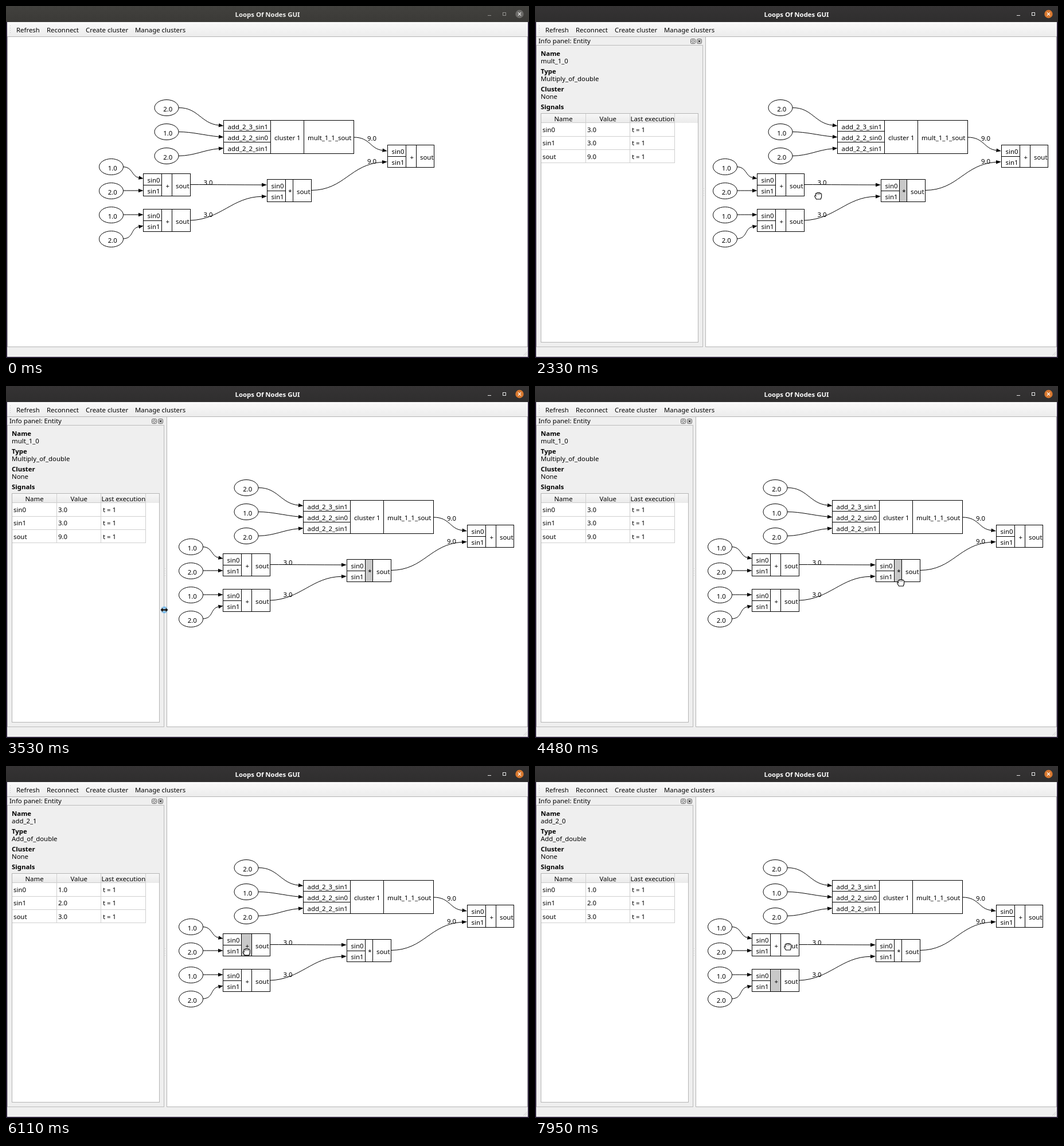
An HTML page with a canvas for the animation above (7.99 s loop, 912x614 px).

```html
<!DOCTYPE html>
<html lang="en">
<head>
<meta charset="utf-8">
<title>Node graph</title>
<style>
html, body { margin: 0; width: 100%; height: 100%; overflow: hidden; background: #fff; }
canvas { display: block; width: 912px; height: 614px; }
</style>
</head>
<body>
<canvas id="stage" width="912" height="614"></canvas>
<script>
const ctx = document.getElementById('stage').getContext('2d');
const LOOP = 7990;
const FONT = '11.4px "Noto Sans", "Open Sans", sans-serif';
const FOCUS_AT = 1510;
const PRESSES = [[1610, 1730], [3290, 3640], [5420, 5540], [6700, 6820]];
const SELECTIONS = [
  { at: 1730, node: 'mult', name: 'mult_1_0', type: 'Multiply_of_double', values: ['3.0', '3.0', '9.0'] },
  { at: 5540, node: 'addA', name: 'add_2_1', type: 'Add_of_double', values: ['1.0', '2.0', '3.0'] },
  { at: 6820, node: 'addB', name: 'add_2_0', type: 'Add_of_double', values: ['1.0', '2.0', '3.0'] }
];
// pointer path: time, x, y
const POINTER = [
  [550, 517, 596], [1340, 493.5, 329.5], [1510, 493.5, 329.5], [1830, 494, 331],
  [2330, 494, 331], [2930, 293, 391.5], [3290, 293, 391.5], [3530, 276, 390.5],
  [3640, 276, 390.5], [4010, 636, 347], [4110, 636, 347], [4190, 638, 343],
  [4480, 638, 343], [4980, 424, 313], [5170, 420, 319], [6030, 420, 320],
  [6510, 415, 374], [6960, 415, 374], [7460, 446, 341], [7750, 446, 341], [7950, 441, 315]
];
const NODES = [
  { id: 'addA', x: 239.5, y: 292.5, cuts: [32, 50], w: 82, sign: '+' },
  { id: 'addB', x: 239.5, y: 354.5, cuts: [32, 50], w: 82, sign: '+' },
  { id: 'mult', x: 455.5, y: 302.5, cuts: [32, 45], w: 77, sign: '*' },
  { id: 'sum', x: 665.5, y: 242.5, cuts: [32, 50], w: 81, sign: '+' }
];
const INPUTS = [
  [280, 177.5, '2.0'], [280, 219.5, '1.0'], [280, 261.5, '2.0'],
  [183.5, 280.5, '1.0'], [183.5, 322.5, '2.0'], [183.5, 364.5, '1.0'], [183.5, 406.5, '2.0']
];
// start, two control points, end; the arrow tip follows
const EDGES = [
  [301, 177.5, 335, 177, 340, 205, 371, 208, 379.5, 209],
  [301, 219.5, 325, 219.5, 345, 225.5, 371, 228, 379.5, 228.8],
  [301, 261.5, 330, 261, 345, 251, 371, 248.8, 379.5, 248],
  [204.5, 280.5, 221, 281, 219, 297, 231.5, 299.5, 239.5, 301],
  [204.5, 322, 212, 322, 222, 322, 231, 322, 239.5, 322],
  [204.5, 364, 212, 364, 222, 364, 231, 364, 239.5, 364],
  [204.5, 406, 223, 405, 217, 388, 231.5, 385, 239.5, 383.5],
  [321.5, 311.5, 360, 311.5, 410, 312, 446, 312, 455, 312],
  [321.5, 374, 375, 372, 395, 333, 446, 332.3, 455, 332],
  [606.5, 229, 635, 229, 635, 249.5, 656.5, 251.7, 665, 253],
  [532.5, 321.5, 590, 321, 600, 276, 656, 272.3, 665, 271.8]
];
const HAND = new Path2D('M-3.5 6 L-6 1.8 Q-7 -.6 -4.5 -.4 L-4.8 -3.2 Q-4.2 -5 -2.6 -4.2 Q-1.4 -6.2 .2 -5 Q1.8 -6 3 -4.4 Q5.5 -5 5.7 -2.3 L5.6 2 L4.2 6 Z');
const FINGERS = new Path2D('M-2.2 -4 V-1.5 M.4 -4.6 V-1.5 M3 -4 V-1.5 M-4.5 -.4 L-3.5 1.5');
const ARROW = new Path2D('M0 0 V12 L3 9.4 L5 13.5 L7 12.6 L5.2 8.6 H9 Z');
const RESIZE = new Path2D('M-6.5 0 L-2.5 -4 V-1.3 H2.5 V-4 L6.5 0 L2.5 4 V1.3 H-2.5 V4 Z');

const smooth = p => p * p * (3 - 2 * p);

function text(str, x, y, color = '#000', align = 'left', weight = '') {
  ctx.font = weight + ' ' + FONT;
  ctx.fillStyle = color;
  ctx.textAlign = align;
  ctx.fillText(str, x, y);
}

function fill(x, y, w, h, color) {
  ctx.fillStyle = color;
  ctx.fillRect(x, y, w, h);
}

function line(x1, y1, x2, y2, color = '#000', width = 1) {
  ctx.strokeStyle = color;
  ctx.lineWidth = width;
  ctx.beginPath();
  ctx.moveTo(x1, y1);
  ctx.lineTo(x2, y2);
  ctx.stroke();
}

function box(x, y, w, h, color = '#000') {
  ctx.strokeStyle = color;
  ctx.lineWidth = 1;
  ctx.strokeRect(x, y, w, h);
}

function cross(x, y, r, color, width) {
  line(x - r, y - r, x + r, y + r, color, width);
  line(x - r, y + r, x + r, y - r, color, width);
}

function disc(x, y, r, color) {
  ctx.fillStyle = color;
  ctx.beginPath();
  ctx.arc(x, y, r, 0, 7);
  ctx.fill();
}

function vertical(y1, y2, from, to) {
  const g = ctx.createLinearGradient(0, y1, 0, y2);
  g.addColorStop(0, from);
  g.addColorStop(1, to);
  return g;
}

function drawWindow(focused) {
  fill(0, 0, 912, 614, '#2b2138');
  fill(0, 0, 912, 28, focused ? vertical(0, 28, '#353334', '#2f2e2e') : vertical(0, 28, '#42413e', '#3b3a37'));
  text('Loops Of Nodes GUI', 456, 19, focused ? '#fff' : '#f2f1ef', 'center', 'bold');
  const icon = focused ? '#e6e6e6' : '#92918e';
  line(840, 16.5, 846, 16.5, icon);
  box(866.5, 11.5, 5, 5, icon);
  disc(895.5, 14, 7.2, focused ? '#d8782f' : '#6c6b68');
  cross(895.5, 14, 2.6, focused ? '#fff' : '#e8e8e6', 1.3);

  fill(2, 28, 908, 584, '#efefef');
  fill(2, 28, 908, 25, vertical(28, 53, '#fafafa', '#ececec'));
  line(2, 53.5, 910, 53.5, '#b4b4b4');
  for (let y = 34; y < 49; y += 4) fill(7, y, 1, 1, '#c4c4c4');
  text('Refresh', 18, 46);
  text('Reconnect', 71, 46);
  text('Create cluster', 139, 46);
  text('Manage clusters', 225, 46);
  for (let i = 0; i < 3; i++) line(908 - i * 3, 610, 909, 609 - i * 3, '#cfcfcf');
}

function drawPanel(right, info) {
  text('Info panel: Entity', 6, 65);
  for (const x of [right - 20.5, right - 9.5]) {
    ctx.strokeStyle = '#555';
    ctx.lineWidth = 1;
    ctx.beginPath();
    ctx.roundRect(x, 57.5, 8, 8, 2);
    ctx.stroke();
  }
  ctx.beginPath();
  ctx.arc(right - 16.5, 61.5, 2, 0, 7);
  ctx.stroke();
  cross(right - 5.5, 61.5, 2, '#333', 1.3);
  box(2.5, 68.5, right - 2, 526, '#bcbcbc');
  for (let y = 318; y < 332; y += 4) fill(right + 2, y, 1, 1, '#c8c8c8');

  const rows = [['Name', info.name], ['Type', info.type], ['Cluster', 'None'], ['Signals', '']];
  rows.forEach(([label, value], i) => {
    text(label, 10, 87 + i * 31, '#000', 'left', 'bold');
    text(value, 10, 100 + i * 31);
  });

  const end = right - 8;
  fill(10, 187, end - 10, 400, '#fff');
  fill(10, 188, end - 10, 16, vertical(188, 204, '#f7f7f7', '#eaeaea'));
  box(10.5, 187.5, end - 10, 399, '#b5b5b5');
  line(11, 203.5, 243, 203.5, '#cacaca');
  for (const x of [88.5, 165.5, 243.5]) line(x, 188, x, 274, '#cfcfcf');
  ['Name', 'Value', 'Last execution'].forEach((s, i) => text(s, 49.5 + i * 77.7, 201, '#000', 'center'));
  ['sin0', 'sin1', 'sout'].forEach((s, i) => {
    const y = 220 + i * 23.4;
    text(s, 13, y);
    text(info.values[i], 91, y);
    text('t = 1', 169, y);
    const bottom = Math.floor(227 + i * 23.3) + 0.5;
    line(11, bottom, 244, bottom, '#cfcfcf');
  });
}

function drawNode(n, selected) {
  const [a, b] = n.cuts;
  if (selected) fill(n.x + a, n.y, b - a, 39, '#c8c8c8');
  box(n.x, n.y, n.w, 39);
  line(n.x + a, n.y, n.x + a, n.y + 39);
  line(n.x + b, n.y, n.x + b, n.y + 39);
  line(n.x, n.y + 20, n.x + a, n.y + 20);
  text('sin0', n.x + 7, n.y + 15.5);
  text('sin1', n.x + 7, n.y + 34.5);
  text(n.sign, n.x + (a + b) / 2 + 1.3, n.y + 25.5, '#000', 'center');
  text('sout', n.x + b + 6.5, n.y + 25.5);
}

function drawEdge([x, y, ax, ay, bx, by, ex, ey, tx, ty]) {
  ctx.strokeStyle = ctx.fillStyle = '#000';
  ctx.lineWidth = 1;
  ctx.beginPath();
  ctx.moveTo(x, y);
  ctx.bezierCurveTo(ax, ay, bx, by, ex, ey);
  ctx.stroke();
  const len = Math.hypot(tx - ex, ty - ey);
  const nx = (ey - ty) / len * 3.2, ny = (tx - ex) / len * 3.2;
  ctx.beginPath();
  ctx.moveTo(tx, ty);
  ctx.lineTo(ex + nx, ey + ny);
  ctx.lineTo(ex - nx, ey - ny);
  ctx.fill();
}

function drawGraph(shift, selected) {
  ctx.save();
  ctx.translate(shift, 0);
  EDGES.forEach(drawEdge);
  for (const [x, y, value] of INPUTS) {
    ctx.beginPath();
    ctx.ellipse(x, y, 21, 14, 0, 0, 7);
    ctx.stroke();
    text(value, x + 2.3, y + 6.5, '#000', 'center');
  }
  box(379.5, 199.5, 227, 58);
  line(461.5, 199, 461.5, 258);
  line(519.5, 199, 519.5, 258);
  line(379, 218.5, 461, 218.5);
  line(379, 237.5, 461, 237.5);
  ['add_2_3_sin1', 'add_2_2_sin0', 'add_2_2_sin1'].forEach((s, i) => text(s, 386.5, 214.5 + i * 19.4));
  text('cluster 1', 468, 234);
  text('mult_1_1_sout', 526, 234);
  NODES.forEach(n => drawNode(n, n.id === selected));
  text('3.0', 344.5, 312);
  text('3.0', 344.5, 368);
  text('9.0', 630, 235);
  text('9.0', 630, 275);
  ctx.restore();
}

function pointerAt(t) {
  const i = POINTER.findIndex(k => k[0] > t);
  if (i < 0) return POINTER[POINTER.length - 1].slice(1);
  const [t0, x0, y0] = POINTER[i - 1], [t1, x1, y1] = POINTER[i];
  const p = smooth((t - t0) / (t1 - t0));
  return [x0 + (x1 - x0) * p, y0 + (y1 - y0) * p];
}

function drawPress(t, x, y) {
  for (const [down, up] of PRESSES) {
    if (t >= down && t < up) disc(x, y, 6, '#78bdf0');
    if (t >= up && t < up + 140) {
      const p = (t - up) / 140;
      ctx.strokeStyle = `rgba(90, 175, 232, ${1 - p * 0.6})`;
      ctx.lineWidth = 1.6;
      ctx.beginPath();
      ctx.arc(x, y, 6 + p * 4, 0, 7);
      ctx.stroke();
    }
  }
}

function drawPointer(t, right) {
  const [x, y] = pointerAt(t);
  drawPress(t, x, y);
  ctx.save();
  ctx.translate(x, y);
  ctx.lineJoin = 'round';
  if (right && x < right + 5) {
    ctx.strokeStyle = '#fff';
    ctx.lineWidth = 1;
    ctx.stroke(RESIZE);
    ctx.fillStyle = '#111';
    ctx.fill(RESIZE);
  } else {
    const open = y < 595;
    const shape = open ? HAND : ARROW;
    ctx.fillStyle = open ? '#fff' : '#111';
    ctx.strokeStyle = open ? '#000' : '#fff';
    ctx.lineWidth = 1.1;
    ctx.fill(shape);
    ctx.stroke(shape);
    if (open) {
      ctx.lineWidth = 0.7;
      ctx.stroke(FINGERS);
    }
  }
  ctx.restore();
}

function draw(t) {
  const info = SELECTIONS.filter(s => t >= s.at).pop();
  const drag = smooth(Math.min(1, Math.max(0, (t - 3290) / 240)));
  const right = info ? Math.round(292 - 17 * drag) : 0;
  const left = info ? right + 5 : 2;

  drawWindow(t >= FOCUS_AT);
  fill(left, 54, 908 - left, 541, '#fff');
  box(left + 0.5, 53.5, 909 - left, 541, '#b4b4b4');
  if (info) drawPanel(right, info);
  drawGraph(info ? Math.round((left - 2) / 2) : 0, info && info.node);
  if (t >= POINTER[0][0]) drawPointer(t, right);
}

const start = performance.now();
function tick() {
  draw((performance.now() - start) % LOOP);
  requestAnimationFrame(tick);
}
tick();
</script>
</body>
</html>
```
